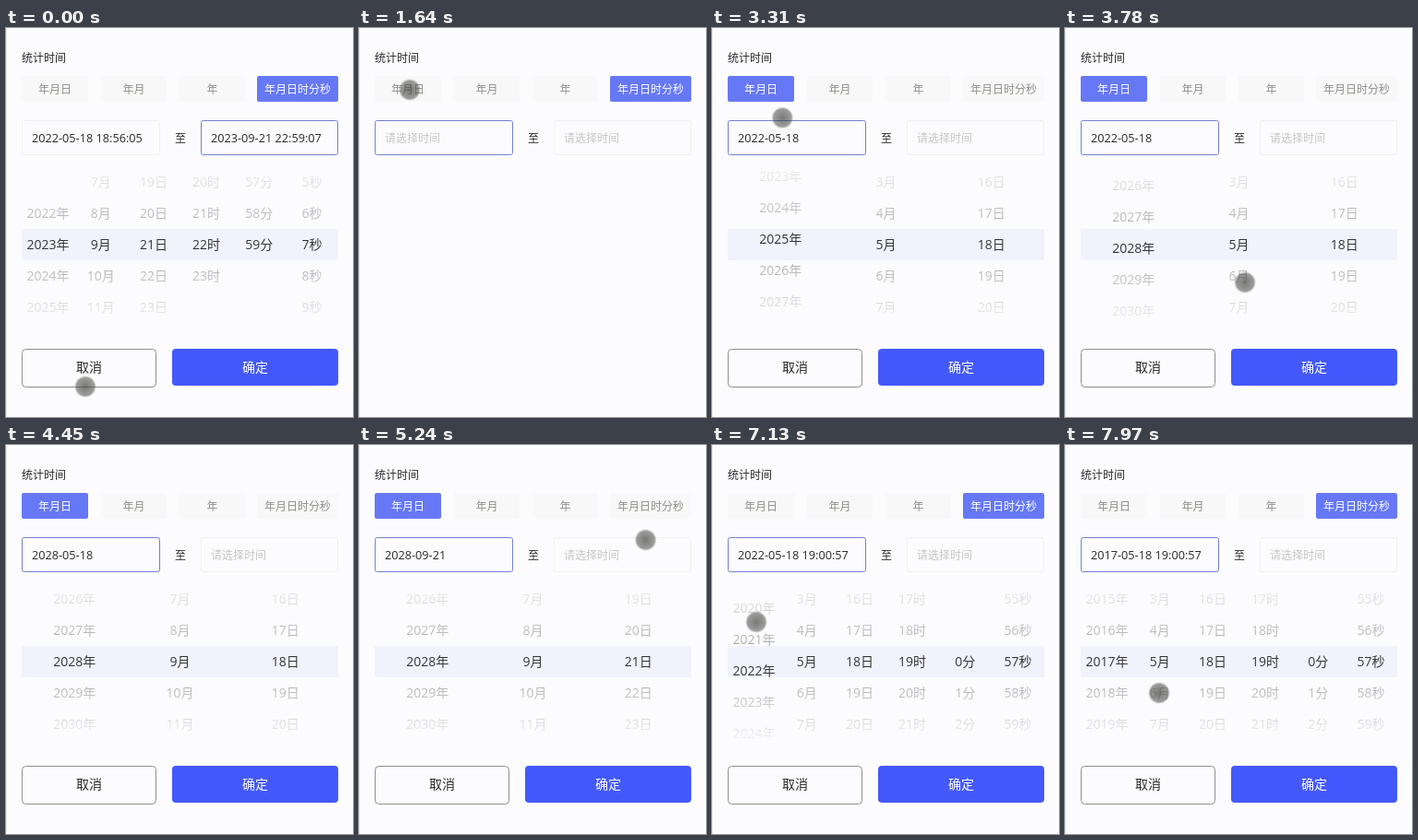
An HTML page with a canvas that plays this animation: 376 by 422 pixels, repeating every 8000 ms.

```html
<!DOCTYPE html>
<html lang="zh-CN">
<head>
<meta charset="utf-8">
<style>
html, body { margin: 0; width: 100%; height: 100%; overflow: hidden; background: #fcfcfe; }
canvas { display: block; }
</style>
</head>
<body>
<canvas id="stage" width="376" height="422"></canvas>
<script>
const g = document.getElementById('stage').getContext('2d');
const LOOP = 8000, ROW = 34, MID = 235, LEFT = 17, WIDTH = 343;
const FONT = '"Open Sans", "Noto Sans CJK SC", "Noto Sans CJK", sans-serif';
const INK = '#2a2a2a', BLUE = '#4459fb', TAB_BLUE = '#6678f6';
const TABS = [['年月日', 17, 72], ['年月', 103, 71], ['年', 188, 71], ['年月日时分秒', 272, 88]];
const UNITS = '年月日时分秒', LOWEST = [0, 1, 1, 0, 0, 0], HIGHEST = [9999, 12, 31, 23, 59, 59];

// When each wheel is flicked
const YEAR_UP = 3040, MONTH_UP = 3820, DAY_UP = 4600, YEAR_DOWN = 7110;

// Pointer moves: leave, arrive, x, y
const MOVES = [
  [130, 1560, 55, 67], [1890, 2270, 72, 128], [2730, 3020, 78, 282],
  [YEAR_UP, 3400, 76, 64], [3540, 3760, 195, 276], [MONTH_UP, 4120, 192, 135],
  [4160, 4540, 300, 290], [DAY_UP, 4860, 300, 175], [4900, 5460, 316, 66],
  [5600, 6040, 90, 120], [6250, 6700, 48, 190], [YEAR_DOWN, 7450, 50, 371],
  [7500, 7960, 102, 269]
];
const BLINKS = [2520, 4450, 6210];

const clamp = p => Math.max(0, Math.min(1, p));
const still = n => ({ pos: n, value: n });

// A flicked wheel slows down; its value is taken over shortly after it stops
function roll(t, start, from, to) {
  const span = 143 * Math.abs(to - from), rest = 1 - clamp((t - start) / span);
  return { pos: to + (from - to) * rest * rest, value: t < start + span + 70 ? from : to };
}

function stamp(wheels) {
  const [y, mo, d, ...time] = wheels.map(w => String(w.value).padStart(2, '0'));
  return [y, mo, d].join('-') + (time.length ? ' ' + time.join(':') : '');
}

// What the form shows at time t
function formAt(t) {
  if (t < 170) {
    const wheels = [2023, 9, 21, 22, 59, 7].map(still);
    return { tab: 3, focus: 1, start: '2022-05-18 18:56:05', end: stamp(wheels), wheels, minYear: 2022 };
  }
  if (t < 1700) return { tab: 3 };
  if (t < 2730) return { tab: 0 };
  if (t < 5540) {
    const wheels = [roll(t, YEAR_UP, 2022, 2028), roll(t, MONTH_UP, 5, 9), roll(t, DAY_UP, 18, 21)];
    return { tab: 0, start: stamp(wheels), wheels };
  }
  if (t < 6210) return { tab: 3 };
  const wheels = [roll(t, YEAR_DOWN, 2022, 2017), ...[5, 18, 19, 0, 57].map(still)];
  return { tab: 3, start: stamp(wheels), wheels };
}

function text(s, x, y, size, color, align = 'center') {
  g.font = size + 'px ' + FONT;
  g.textAlign = align;
  g.fillStyle = color;
  g.fillText(s, x, y + size * 0.37);
}

function box(x, y, w, h, r, fill) {
  g.beginPath();
  g.roundRect(x, y, w, h, r);
  g.fillStyle = fill;
  g.fill();
}

function frame(x, y, w, h, r, color) {
  g.beginPath();
  g.roundRect(x + 0.5, y + 0.5, w - 1, h - 1, r);
  g.strokeStyle = color;
  g.stroke();
}

function field(x, w, value, focused) {
  frame(x, 100, w, 38, 2, focused ? '#7480d0' : '#f0f0f2');
  if (value) text(value, x + 11, 119.5, 12.7, INK, 'left');
  else text('请选择时间', x + 11, 119.5, 12, '#c6c6c4', 'left');
}

function picker(wheels, minYear = 0) {
  const w = WIDTH / wheels.length;
  box(LEFT, 218, WIDTH, ROW, 0, '#f0f3fb');
  g.save();
  g.beginPath();
  g.rect(LEFT, 150, WIDTH, 170);
  g.clip();
  wheels.forEach(({ pos }, i) => {
    const c = Math.round(pos);
    const first = Math.max(c - 3, i ? LOWEST[i] : minYear), last = Math.min(c + 3, HIGHEST[i]);
    for (let n = first; n <= last; n++)
      text(n + UNITS[i], LEFT + w * (i + 0.5), MID + (n - pos) * ROW, 14, '#363636');
  });
  for (const [edge, inner] of [[150, 218], [320, 252]]) {
    const fade = g.createLinearGradient(0, edge, 0, inner);
    fade.addColorStop(0, 'rgba(252,252,254,.95)');
    fade.addColorStop(1, 'rgba(252,252,254,.6)');
    g.fillStyle = fade;
    g.fillRect(LEFT, Math.min(edge, inner), WIDTH, 68);
  }
  g.restore();
  frame(17, 348, 146, 42, 4, '#8e8e8a');
  text('取消', 90, 368, 14, INK);
  box(180, 348, 180, 40, 4, BLUE);
  text('确定', 270, 368, 14, '#fff');
}

function pointer(t) {
  if (BLINKS.some(b => t >= b && t < b + 40)) return;
  let x = 86, y = 389;
  for (const [leave, arrive, toX, toY] of MOVES) {
    const p = clamp((t - leave) / (arrive - leave)), e = p * p * (3 - 2 * p);
    x += (toX - x) * e;
    y += (toY - y) * e;
  }
  const shade = g.createRadialGradient(x, y, 0, x, y, 12);
  shade.addColorStop(0, 'rgba(64,64,60,.7)');
  shade.addColorStop(0.8, 'rgba(76,76,72,.55)');
  shade.addColorStop(1, 'rgba(90,90,86,0)');
  g.fillStyle = shade;
  g.fillRect(x - 12, y - 12, 24, 24);
}

function draw(t) {
  const form = formAt(t);
  box(0, 0, 376, 422, 0, '#fcfcfe');
  box(0, 0, 1, 422, 0, '#ecece0');
  text('统计时间', 17, 32.5, 12, INK, 'left');
  TABS.forEach(([label, x, w], i) => {
    const on = i === form.tab;
    box(x, 52, w, 28, 2, on ? TAB_BLUE : '#f8f8f8');
    text(label, x + w / 2, 66.5, 12, on ? '#fff' : '#8e8e8a');
  });
  field(17, 150, form.start, !form.focus);
  text('至', 189, 119.5, 12, INK);
  field(211, 149, form.end, form.focus);
  if (form.wheels) picker(form.wheels, form.minYear);
  pointer(t);
}

const begin = performance.now();
function tick() {
  draw((performance.now() - begin) % LOOP);
  requestAnimationFrame(tick);
}
tick();
</script>
</body>
</html>
```
